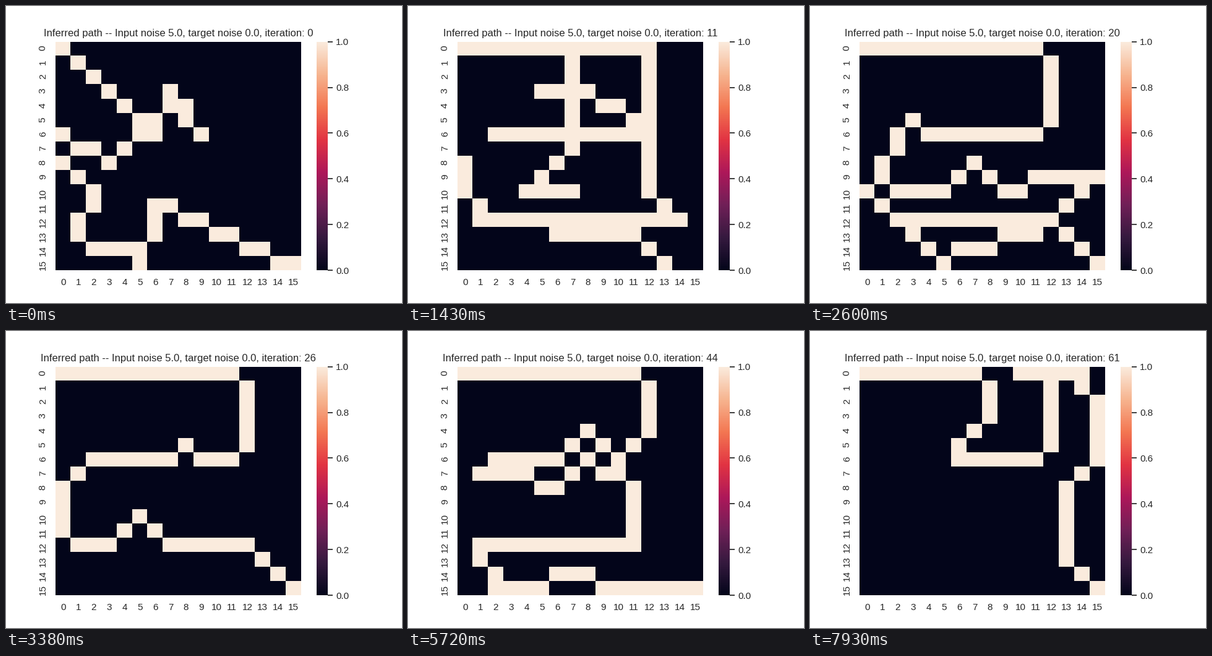
A matplotlib script that plays this animation: 640x480 px, repeating every 8 s.

```python
import matplotlib.pyplot as plt
import numpy as np
from matplotlib.animation import FuncAnimation
from matplotlib.colors import LinearSegmentedColormap

N = 16
LOOP, STEP, TICK = 8000, 130, 20  # ms
LAST = LOOP // STEP

plt.rcParams.update({
    "font.family": "Liberation Sans",
    "font.size": 12,
    "axes.titlesize": 12,
    "text.color": ".15",
    "xtick.bottom": False, "ytick.left": False,
})
for axis in ("xtick", "ytick"):
    plt.rcParams.update({
        f"{axis}.color": ".15", f"{axis}.labelsize": 11,
        f"{axis}.major.size": 6, f"{axis}.major.width": 1.25,
    })

ROCKET = LinearSegmentedColormap.from_list("rocket", [
    "#03051a", "#35193e", "#701f57", "#ad1759",
    "#e13342", "#f37651", "#f6b48f", "#faebdd"])


def trace(*routes):
    """Grid crossed by routes, each a chain of (row, col) waypoints."""
    grid = np.zeros((N, N))
    for route in routes:
        for p, q in zip(route, route[1:]):
            n = np.abs(np.subtract(q, p)).max() + 1
            rows, cols = np.linspace(p, q, n).round().astype(int).T
            grid[rows, cols] = 1
    return grid


# Legs that several routes share.
top = [(0, 0), (0, 11), (1, 12), (5, 12), (6, 11)]
west = [(6, 2), (8, 0), (11, 0), (12, 1)]
end = [(12, 12), (15, 15)]

start = trace(
    [(0, 0), (6, 6), (3, 7), (6, 9)],
    [(6, 0), (8, 3), (6, 5)],
    [(8, 0), (10, 2), (13, 1), (15, 5), (11, 6), (15, 15)])

crowded = trace(
    [(0, 0), (0, 12), (10, 12), (12, 14), (12, 1), (8, 0)],
    [(6, 2), (6, 12)],
    [(1, 7), (7, 7), (10, 4), (10, 7)],
    [(3, 5), (3, 8), (5, 11)],
    [(13, 6), (13, 11), (15, 13)])

forming = trace(
    top + [(6, 4), (5, 3), (10, 0), (12, 2)] + end,
    [(10, 2), (10, 5), (8, 7), (10, 9), (9, 11), (9, 15), (11, 13)],
    [(13, 3), (15, 5), (13, 9), (13, 11)])

clear = trace(top + [(6, 9), (5, 8), (6, 6)] + west
              + [(12, 3), (10, 5), (12, 7)] + end)

settled = trace(top + west + [(12, 12), (13, 13), (12, 14), (15, 15)])

looping = trace(
    top[:3] + [(4, 12), (6, 10), (4, 8), (6, 6)] + west[:1]
    + [(7, 1), (7, 4), (8, 6), (6, 8), (8, 11), (12, 11)] + west[-1:]
    + [(15, 2), (15, 5), (14, 7), (15, 9), (15, 15)])

drifted = trace(
    [(0, 0), (0, 7), (2, 8), (6, 6), (6, 11), (5, 12), (0, 12)],
    [(0, 10), (0, 14), (2, 15), (6, 15), (8, 13), (13, 13), (15, 15)])

poses = [(0, start), (11, crowded), (20, forming), (26, clear),
         (35, settled), (44, looping), (LAST, drifted)]

# Between two poses each cell switches over at its own random moment.
rng = np.random.default_rng(5)
paths = []
for (a, old), (b, new) in zip(poses, poses[1:]):
    moment = rng.random((N, N))
    paths += [np.where(moment < (i - a) / (b - a), new, old)
              for i in range(a, b)]
paths.append(drifted)

fig, ax = plt.subplots(figsize=(6.4, 4.8), dpi=100)
mesh = ax.pcolormesh(paths[0], cmap=ROCKET, vmin=0, vmax=1, snap=False)
ax.set(xlim=(0, N), ylim=(N, 0))
ax.spines[:].set_visible(False)
ax.set_xticks(np.arange(N) + 0.5, range(N))
ax.set_yticks(np.arange(N) + 0.5, range(N), rotation="vertical")
bar = fig.colorbar(mesh, ax=ax)
bar.outline.set_linewidth(0)
title = ax.set_title("")


def update(k):
    i = min((k * TICK + TICK // 2) // STEP, LAST)
    mesh.set_array(paths[i])
    title.set_text("Inferred path -- Input noise 5.0, "
                   f"target noise 0.0, iteration: {i}")
    return mesh, title


anim = FuncAnimation(fig, update, frames=LOOP // TICK, interval=TICK,
                     repeat=True, cache_frame_data=False)
plt.show()
```
